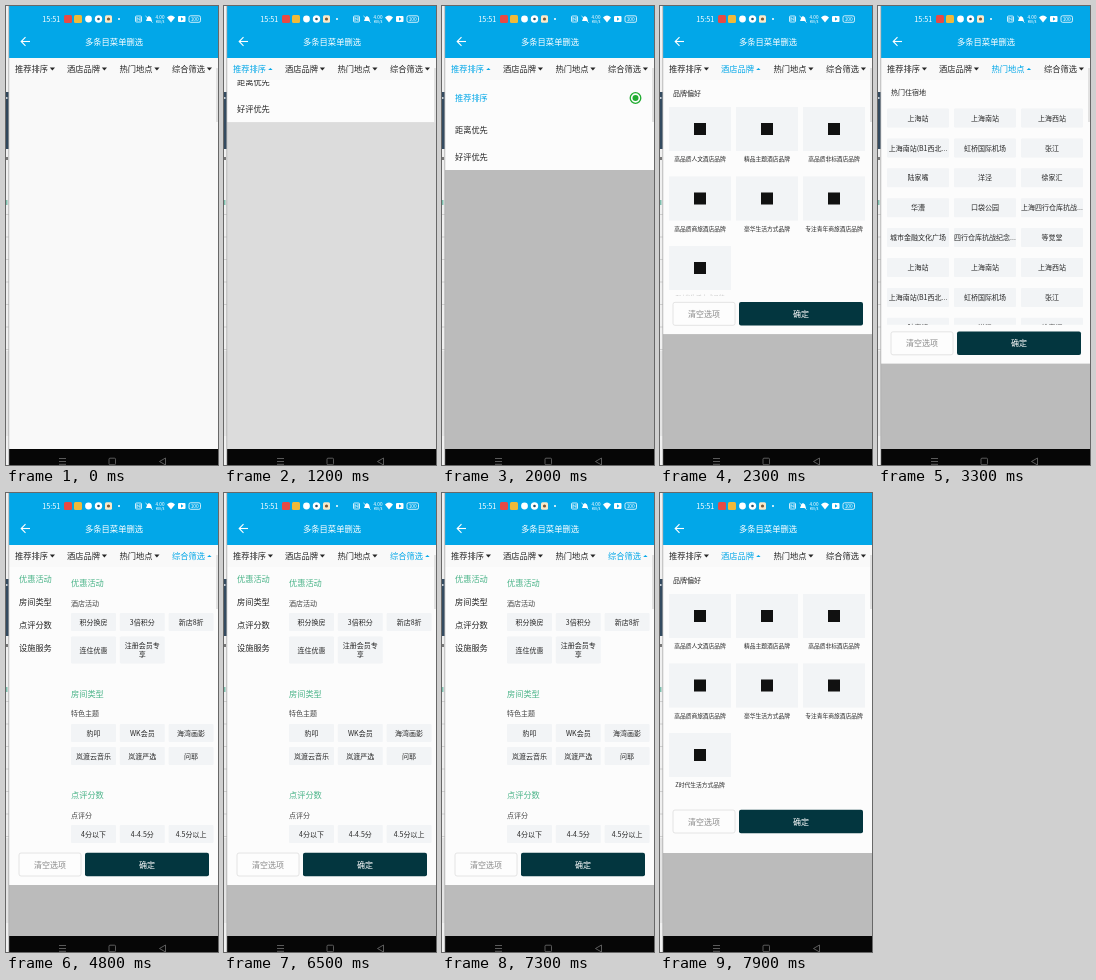
Animation, 212 px wide and 459 px high, one loop 8000 ms. Source, as an HTML page with a canvas:

```html
<!DOCTYPE html>
<html lang="zh-CN">
<head>
<meta charset="utf-8">
<title>多条目菜单删选</title>
<style>
html, body { margin: 0; width: 100%; height: 100%; overflow: hidden; background: #f9f9f9; }
canvas { display: block; width: 212px; height: 459px; }
</style>
</head>
<body>
<canvas id="stage"></canvas>
<script>
const W = 212, H = 459, LOOP = 8000;
const BLUE = '#02a7e8', INK = '#262626', GREEN = '#4bb489', CELL = '#f2f4f6', PANEL = '#fcfcfc';
const FONT = '"Noto Sans CJK SC", "Noto Sans CJK", "Noto Sans CJK JP", "Noto Sans", sans-serif';
const TOP = 74, NAV = 443, SHADE = 0.25;

const canvas = document.getElementById('stage');
const ctx = canvas.getContext('2d');
const dpr = window.devicePixelRatio || 1;
canvas.width = W * dpr;
canvas.height = H * dpr;

// Each step opens a menu; the panel moves to its bottom edge over dur ms.
const steps = [
  { at: 1060, dur: 300, menu: 0, bottom: 164 },
  { at: 2150, dur: 170, menu: 1, bottom: 349 },
  { at: 3260, dur: 200, menu: 2, bottom: 392 },
  { at: 4660, dur: 200, menu: 3, bottom: 392 },
  { at: 7760, dur: 190, menu: 1, bottom: 349 }
];

const tabs = [['推荐排序', 9], ['酒店品牌', 61], ['热门地点', 113.5], ['综合筛选', 166]];
const brands = ['高品质人文酒店品牌', '精品主题酒店品牌', '高品质非标酒店品牌',
  '高品质商旅酒店品牌', '豪华生活方式品牌', '专注青年商旅酒店品牌', 'Z时代生活方式品牌'];
const places = ['上海站', '上海南站', '上海西站', '上海南站(B1西北...', '虹桥国际机场', '张江',
  '陆家嘴', '洋泾', '徐家汇', '华漕', '口袋公园', '上海四行仓库抗战...',
  '城市金融文化广场', '四行仓库抗战纪念...', '等觉堂'];
const groups = [
  { name: '优惠活动', y: 90, sub: '酒店活动', subY: 110, rows: [
    [129, ['积分换房', '3倍积分', '新店8折']], [157, ['连住优惠', '注册会员专|享']]] },
  { name: '房间类型', y: 201, sub: '特色主题', subY: 220, rows: [
    [240, ['豹叩', 'WK会员', '海湾画影']], [263, ['岚渡云音乐', '岚渡严选', '问耶']]] },
  { name: '点评分数', y: 302, sub: '点评分', subY: 322, rows: [
    [341, ['4分以下', '4-4.5分', '4.5分以上']]] }
];

function rect(x, y, w, h, color) {
  ctx.fillStyle = color;
  ctx.fillRect(x, y, w, h);
}

function round(x, y, w, h, r, fill, stroke) {
  ctx.beginPath();
  ctx.roundRect(x, y, w, h, r);
  if (fill) { ctx.fillStyle = fill; ctx.fill(); }
  if (stroke) { ctx.strokeStyle = stroke; ctx.lineWidth = 0.8; ctx.stroke(); }
}

function disc(x, y, r, color) {
  ctx.beginPath();
  ctx.arc(x, y, r, 0, Math.PI * 2);
  ctx.fillStyle = color;
  ctx.fill();
}

function line(color, width, ...pts) {
  ctx.beginPath();
  for (let i = 0; i < pts.length; i += 2) ctx.lineTo(pts[i], pts[i + 1]);
  ctx.strokeStyle = color;
  ctx.lineWidth = width;
  ctx.stroke();
}

function shape(color, ...pts) {
  ctx.beginPath();
  for (let i = 0; i < pts.length; i += 2) ctx.lineTo(pts[i], pts[i + 1]);
  ctx.fillStyle = color;
  ctx.fill();
}

function text(s, x, y, size, color = INK, align = 'left', weight = 400) {
  ctx.font = `${weight} ${size}px ${FONT}`;
  ctx.textAlign = align;
  ctx.textBaseline = 'middle';
  ctx.fillStyle = color;
  ctx.fillText(s, x, y);
}

function clipped(y, bottom, draw) {
  ctx.save();
  ctx.beginPath();
  ctx.rect(3, y, W - 3, Math.max(0, bottom - y));
  ctx.clip();
  draw();
  ctx.restore();
}

function stateAt(t) {
  let bottom = TOP, menu = -1;
  for (const s of steps) {
    if (t < s.at) break;
    bottom += (s.bottom - bottom) * Math.min(1, (t - s.at) / s.dur);
    menu = s.menu;
  }
  const fade = (t - steps[0].at) / steps[0].dur;
  return { bottom, menu, shade: SHADE * Math.max(0, Math.min(1, fade)) };
}

function sortMenu(bottom) {
  const dy = bottom - 164;
  text('推荐排序', 13, 92 + dy, 8.2, BLUE);
  text('距离优先', 13, 123.5 + dy, 8.2);
  text('好评优先', 13, 151 + dy, 8.2);
  ctx.beginPath();
  ctx.arc(193.5, 92 + dy, 5.3, 0, Math.PI * 2);
  ctx.strokeStyle = '#20ac30';
  ctx.lineWidth = 1.3;
  ctx.stroke();
  disc(193.5, 92 + dy, 3, '#20ac30');
}

function brandMenu() {
  text('品牌偏好', 13, 87, 7, INK, 'left', 500);
  brands.forEach((name, i) => {
    const x = 9 + (i % 3) * 67, y = 101 + Math.floor(i / 3) * 69.5;
    rect(x, y, 62, 44, CELL);
    rect(x + 25, y + 16, 12, 12, '#111');
    text(name, x + 31, y + 52, 5.75, INK, 'center');
  });
}

function placeMenu() {
  text('热门住宿地', 13, 86.5, 7, INK, 'left', 500);
  for (let i = 0; i < 27; i++) {
    const x = 9 + (i % 3) * 67, y = 112 + Math.floor(i / 3) * 29.9;
    round(x, y - 9.5, 62, 19, 1, CELL);
    text(places[i % 15], x + 31, y, 7, INK, 'center');
  }
}

function filterMenu() {
  groups.concat({ name: '设施服务' }).forEach((g, i) =>
    text(g.name, 13, 86 + i * 23, 8.2, i ? INK : GREEN));
  for (const g of groups) {
    text(g.name, 65, g.y, 8.2, GREEN);
    text(g.sub, 65, g.subY, 7, '#444');
    for (const [y, names] of g.rows) {
      names.forEach((name, i) => {
        const x = 65 + i * 48.8, lines = name.split('|');
        const h = y === 157 ? 27 : 18;
        round(x, y - h / 2, 45, h, 1, CELL);
        lines.forEach((s, k) =>
          text(s, x + 22.5, y + (k - (lines.length - 1) / 2) * 9, 7, INK, 'center'));
      });
    }
  }
}

function buttons(y) {
  round(13, y - 11.5, 62, 23, 2, '#fdfdfd', '#dedede');
  text('清空选项', 44, y, 8, '#8a8a8a', 'center');
  round(79, y - 11.8, 124, 23.6, 2, '#03363f');
  text('确定', 141, y, 8, '#fff', 'center', 500);
}

function panel({ menu, bottom }) {
  clipped(TOP, bottom, () => {
    rect(3, TOP, W - 3, bottom - TOP, PANEL);
    if (menu === 0) return sortMenu(bottom);
    const mid = Math.min(bottom - 20.5, menu === 1 ? 328.5 : 372);
    clipped(TOP, mid - 18.5, [null, brandMenu, placeMenu, filterMenu][menu]);
    buttons(mid);
  });
}

function statusBar() {
  text('15:51', 36.3, 13, 7.2, '#fff', 'left', 500);
  round(58, 9, 8, 8, 1.5, '#e64a45');
  round(68, 9, 8, 8, 1.5, '#f0b93a');
  disc(82.5, 13, 3.4, '#fff');
  disc(92.5, 13, 3.7, '#fff');
  disc(92.5, 13, 1.3, '#24506a');
  round(99, 9.3, 7, 7.4, 1.5, '#fbe9c8');
  disc(102.5, 13, 1.6, '#7a5a3a');
  disc(113, 13, 1, '#fff');
  round(129.5, 10, 6, 6, 1, null, '#fff');
  line('#fff', 0.8, 131, 15, 131, 11.5, 134, 14.5, 134, 11);
  shape('#fff', 140, 15, 141.5, 11, 143, 10, 145, 11.5, 146, 15);
  line('#fff', 0.8, 139.5, 10, 146.5, 16.5);
  text('4.00', 154, 11, 4.6, '#fff', 'center', 500);
  text('KB/s', 154, 15.5, 4, '#fff', 'center', 500);
  shape('#fff', 161, 11.5, 163, 10, 165, 9.5, 167, 10, 169, 11.5, 165, 16.5);
  round(172, 10, 7.5, 6, 1, '#fff');
  shape(BLUE, 175, 11.3, 177.5, 13, 175, 14.7);
  round(183, 9.8, 11.5, 6.5, 1.6, null, '#fff');
  text('100', 188.7, 13.1, 4.8, '#fff', 'center', 500);
}

function header(menu) {
  rect(3, 0, W - 3, 52, BLUE);
  statusBar();
  line('#fff', 1.1, 24, 35.5, 15.5, 35.5);
  line('#fff', 1.1, 19.5, 31.2, 15.2, 35.5, 19.5, 39.8);
  text('多条目菜单删选', 108, 36, 8.3, '#fff', 'center');
  rect(3, 52, W - 3, TOP - 52, '#f9f9f9');
  tabs.forEach(([name, x], i) => {
    const on = i === menu, c = on ? BLUE : INK;
    const w = on ? 2.2 : 2.6, d = on ? -1.1 : 1.4;
    text(name, x, 63, 8.25, c);
    shape(c, x + 37.4 - w, 63 - d, x + 37.4 + w, 63 - d, x + 37.4, 63 + d);
  });
}

function sideStrip(t) {
  rect(0, 0, 3, H, '#f0f0f0');
  rect(0, 86, 3, 57, t < 800 ? '#30475c' : '#344b60');
  rect(0, 91, 1.5, 2, '#c8d0d8');
  rect(0, 151, 2, 3, '#777');
  rect(0, 194, 1.5, 5, '#7fbfae');
  for (let y = 208; y < 350; y += 22.5) rect(0, y, 3, 1, '#cfcfcf');
  rect(0, 345, 3, 85, '#e4e4e4');
  rect(2.4, 0, 0.8, H, '#acacac');
}

function navBar() {
  rect(3, NAV, W - 3, H - NAV, '#060606');
  for (const y of [452.5, 455.5, 458.3]) line('#707070', 0.8, 53, y, 60, y);
  round(103, 452.2, 6.5, 6.5, 1, null, '#707070');
  line('#707070', 0.8, 159.5, 452, 153.5, 455.5, 159.5, 459, 159.5, 452);
}

function draw(t) {
  const s = stateAt(t);
  ctx.setTransform(dpr, 0, 0, dpr, 0, 0);
  rect(0, 0, W, H, '#f9f9f9');
  rect(3, TOP, W - 3, NAV - TOP, `rgba(0,0,0,${s.shade})`);
  if (s.menu >= 0) panel(s);
  header(s.menu);
  rect(210, 62, 2, 54, '#e2e2e2');
  navBar();
  sideStrip(t);
}

const start = performance.now();
function tick() {
  draw((performance.now() - start) % LOOP);
  requestAnimationFrame(tick);
}
tick();
</script>
</body>
</html>
```
